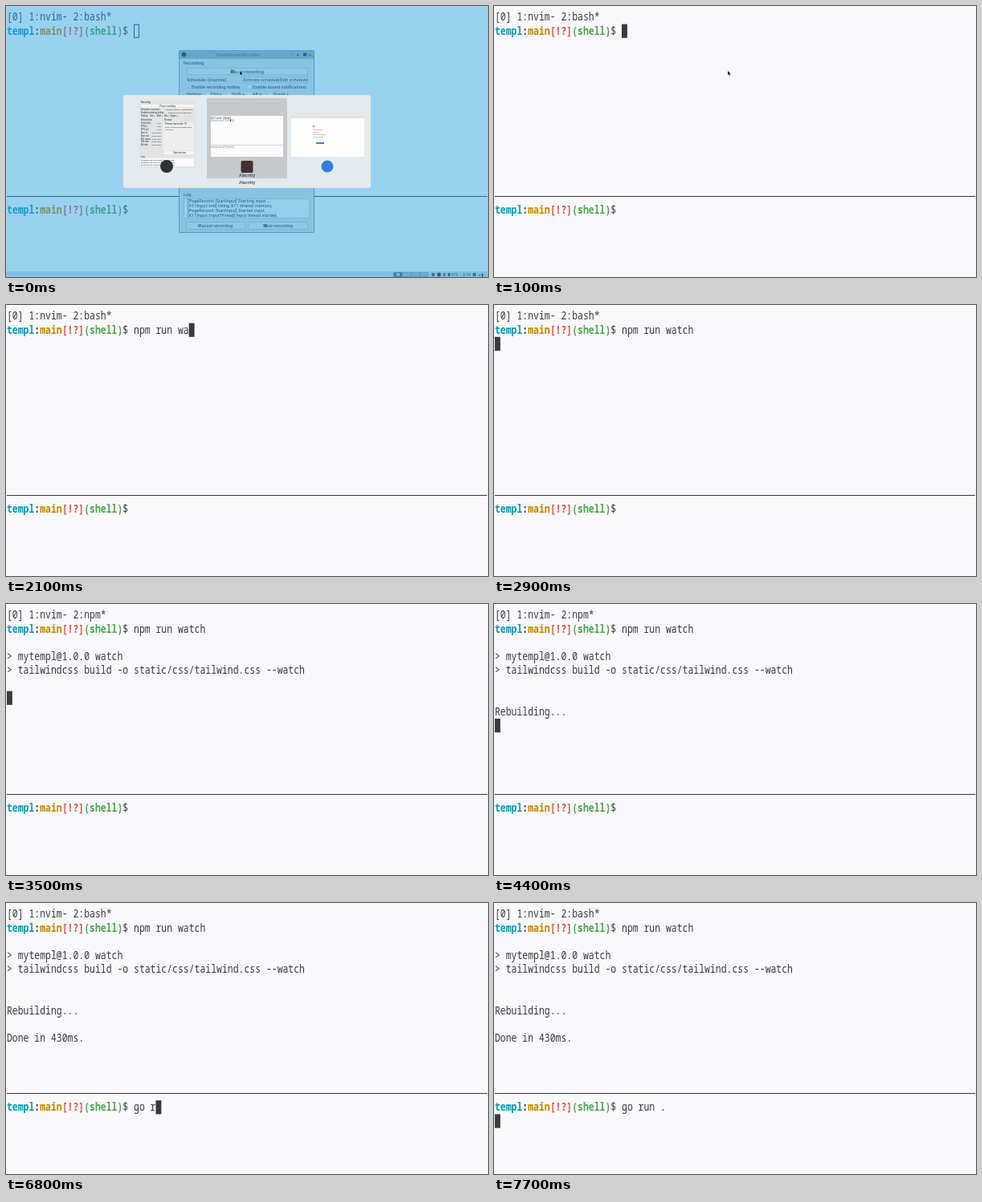
Animation, 600 px wide and 338 px high, one loop 8000 ms. Source, as an HTML page with a canvas:

```html
<!DOCTYPE html>
<html lang="en">
<head>
<meta charset="utf-8">
<title>Terminal session</title>
<style>
html, body { margin: 0; width: 100%; height: 100%; overflow: hidden; background: #f9f8fa; }
canvas { display: block; }
</style>
</head>
<body>
<canvas id="stage" width="600" height="338"></canvas>
<script>
const ctx = document.getElementById('stage').getContext('2d');
const LOOP = 8000, CELL = 6.87, ROW = 17.2, TALL = 1.2;
const INK = '#383a42', PAPER = '#f9f8fa';
const MONO = '11.45px "Noto Sans Mono", monospace';
const PROMPT = [['templ', '#0997b3'], [':', INK], ['main', '#c18401'],
  ['[!?]', '#d9564a'], ['(shell)', '#50a14f']];

// Keystroke times, one per character
const TOP = { text: 'npm run watch', keys: [1000, 1100, 1100, 1200, 1300, 1300, 1500, 1700, 1800, 2100, 2300, 2500, 2600] };
const BOTTOM = { text: 'go run .', keys: [6400, 6500, 6700, 6800, 6900, 7000, 7200, 7300] };
const typed = (cmd, t) => cmd.text.slice(0, cmd.keys.filter(k => k <= t).length);

function rect(x, y, w, h, fill, radius = 0) {
  ctx.fillStyle = fill;
  ctx.beginPath();
  ctx.roundRect(x, y, w, h, radius);
  ctx.fill();
}

function dot(x, y, r, fill) {
  ctx.fillStyle = fill;
  ctx.beginPath();
  ctx.arc(x, y, r, 0, 7);
  ctx.fill();
}

function cells(text, col, row, color = INK, bold = false) {
  ctx.save();
  ctx.font = (bold ? 'bold ' : '') + MONO;
  ctx.textAlign = 'left';
  ctx.fillStyle = color;
  ctx.translate(1, 18.3 + row * ROW);
  ctx.scale(1, TALL);
  [...text].forEach((ch, i) => ctx.fillText(ch, (col + i) * CELL, 0));
  ctx.restore();
}

function prompt(row, command) {
  let col = 0;
  for (const [text, color] of PROMPT) {
    cells(text, col, row, color, true);
    col += text.length;
  }
  cells('$ ' + command, col, row);
}

function cursor(col, row, hollow) {
  const x = 1 + col * CELL, y = 5.4 + row * ROW;
  if (!hollow) return rect(x, y, CELL, ROW, INK);
  ctx.strokeStyle = INK;
  ctx.lineWidth = 1;
  ctx.strokeRect(x + .5, y + .5, CELL - 1, ROW - 1);
}

function terminal(t, hollow) {
  const top = typed(TOP, t), bottom = typed(BOTTOM, t);
  rect(0, 0, 600, 338, PAPER);
  cells('[0] 1:nvim- 2:' + (t >= 3500 && t < 5800 ? 'npm*' : 'bash*'), 0, 0);
  prompt(1, top);
  if (t >= 3500) {
    cells('> mytempl@1.0.0 watch', 0, 3);
    cells('> tailwindcss build -o static/css/tailwind.css --watch', 0, 4);
  }
  if (t >= 4100) cells('Rebuilding...', 0, 7);
  if (t >= 4600) cells('Done in 430ms.', 0, 9);
  rect(1, 237, 598, 1, INK);
  prompt(14, bottom);

  if (t < 2900) cursor(23 + top.length, 1, hollow);
  else if (t < 3500) cursor(0, 2);
  else if (t < 4100) cursor(0, 6);
  else if (t < 4600) cursor(0, 8);
  else if (t < 5800) cursor(0, 10);
  else if (t < 7700) cursor(23 + bottom.length, 14);
  else cursor(0, 15);
}

function label(text, x, y, size = 5.7, align = 'left', color = '#1c2830') {
  ctx.font = size + 'px Roboto, sans-serif';
  ctx.textAlign = align;
  ctx.fillStyle = color;
  ctx.fillText(text, x, y);
}

function button(text, x, y, w, h) {
  rect(x, y, w, h, '#9aa4aa', 1.5);
  rect(x + .5, y + .5, w - 1, h - 1, '#e6e8e9', 1);
  label(text, x + w / 2, y + h / 2 + 2, 5.7, 'center');
}

function check(text, x, y, on) {
  rect(x, y - 4, 4, 4, '#f4f4f4');
  if (on) label('✓', x, y, 5);
  label(text, x + 6, y);
}

function recorder() {
  rect(215, 55, 169, 228, '#839198', 2);
  rect(216, 66, 167, 216, '#dcdfe0');
  rect(216, 55.5, 167, 10.5, '#a0adb3', 2);
  dot(221.5, 60.5, 3, '#26333c');
  label('SimpleScreenRecorder', 289, 62.5, 5.4, 'center', '#4c5a62');
  label('–', 355, 62, 5);
  label('▴', 362, 62, 5);
  rect(370, 58.5, 4, 4, '#26333c');
  label('×', 377, 62.5, 6);

  label('Recording', 221, 72.5);
  button('Pause recording', 225, 77, 151, 9);
  rect(280, 79.5, 1.3, 4.5, '#1c2830');
  rect(282.3, 79.5, 1.3, 4.5, '#1c2830');
  label('Schedule: (inactive)', 225, 94);
  button('Activate schedule', 295, 88, 45, 8);
  button('Edit schedule', 341, 88, 35, 8);
  check('Enable recording hotkey', 225, 103, true);
  check('Enable sound notifications', 301, 103);
  label('Hotkey:', 225, 112);
  ['Ctrl +', 'Shift +', 'Alt +', 'Super +'].forEach((k, i) => check(k, 249 + i * 26, 112));

  label('Log', 221, 237);
  rect(221, 240, 157, 25, '#9aa4aa');
  rect(221.5, 240.5, 156, 24, '#f2f2f2');
  ['[PageRecord::StartInput] Starting input ...',
    '[X11Input::Init] Using X11 shared memory.',
    '[PageRecord::StartInput] Started input.',
    '[X11Input::InputThread] Input thread started.']
    .forEach((line, i) => label(line, 226, 245 + i * 5.9));
  button('Cancel recording', 224, 269.5, 74, 9);
  button('Save recording', 301, 269.5, 75, 9);
  rect(239, 272, 4, 4, '#a08088', 1);
  rect(321, 272, 4, 4, '#52616a', 1);
}

function taskbar() {
  rect(0, 331, 600, 7, '#d2d8db');
  rect(482, 332, 44, 6, '#7a8c96');
  for (let i = 0; i < 4; i++) rect(483 + i * 11, 332.5, 10, 5, i ? '#a9b7be' : '#52636d');
  rect(486, 333.5, 4, 3, '#dce3e6');
  rect(530, 333, 3.5, 4, '#42525c');
  dot(539, 335, 2.4, '#26333c');
  rect(544, 333, 3, 4, '#a85d55');
  rect(550, 333, 3, 4, '#42525c');
  label('47%  - 3:14', 554, 337, 5);
  rect(581, 333, 4, 4, '#42525c');
  label('◂ ▮', 588, 337, 5);
}

function switcher() {
  rect(146, 111, 308, 116, 'rgba(231,235,238,.97)', 3);
  rect(250, 115, 100, 100, '#c6c9cb');

  rect(166, 117, 70, 85, '#e2e3e4');
  label('Recording', 168, 121, 2.7);
  rect(168, 123, 66, 3.5, '#f5f5f5');
  label('Pause recording', 201, 126, 2.7, 'center');
  label('Schedule: (inactive)', 168, 130, 2.7);
  label('Activate schedule   Edit schedule', 198, 130, 2.4);
  label('Enable recording hotkey', 168, 134, 2.7);
  label('Enable sound notifications', 202, 134, 2.5);
  label('Hotkey:   Ctrl +   Shift +   Alt +   Super +', 168, 138, 2.7);
  label('Information', 168, 143, 2.7);
  label('Preview', 197, 143, 2.7);
  ['Total time:', 'FPS in:', 'FPS out:', 'Size in:', 'Size out:', 'File name:', 'File size:', 'Bit rate:']
    .forEach((name, i) => {
      label(name, 168, 147 + i * 3.9, 2.7);
      label(i < 3 ? '0.00' : '1920x1080', 193, 147 + i * 3.9, 2.5, 'right');
    });
  rect(196, 145, 38, 35, '#eeeeee');
  label('Preview frame rate: 10', 198, 148, 2.7);
  label('Note: Previewing requires extra', 198, 152, 2.4);
  label('CPU time.', 198, 155, 2.4);
  rect(197, 181, 37, 4, '#f5f5f5');
  label('Start preview', 216, 184, 2.7, 'center');
  label('Log', 168, 189, 2.7);
  rect(167, 190, 67, 10, '#fafafa');
  for (let i = 0; i < 3; i++) label('[PageRecord::StartInput] Started input.', 168, 193 + i * 3, 2.5);

  rect(255, 137, 90, 51, '#fbfbfc');
  label('[0] 1:nvim- 2:bash*', 255.5, 140.5, 3);
  label('templ:main[!?](shell)$', 255.5, 143.5, 3, 'left', '#7c8d78');
  rect(279, 141, 1, 3, INK);
  label('templ:main[!?](shell)$', 255.5, 177, 3, 'left', '#7c8d78');
  rect(255, 173, 90, .4, '#aaa');

  rect(355, 137, 91, 51, '#fdfdfd');
  rect(355, 137, 91, 3, '#dfe3e7');
  dot(383, 150, 1.4, '#a9b4bf');
  for (let i = 0; i < 4; i++) rect(382, 154 + i * 3, [12, 8, 16, 13][i], .7, '#aab0b5');
  rect(386, 170, 10, 2, '#3d7fdc');

  dot(200, 200, 8, '#2d3235');
  rect(292.5, 193, 15, 15, '#40322f', 2);
  dot(400, 200, 7.5, '#327fdb');
  label('Alacritty', 300, 212.5, 5.5, 'center');
  label('Alacritty', 300, 221.5, 5.5, 'center');
}

function pointer(x, y) {
  ctx.beginPath();
  for (const [dx, dy] of [[0, 0], [0, 5], [1.2, 4], [2, 6], [3, 5.5], [2.2, 3.7], [3.8, 3.5]]) ctx.lineTo(x + dx, y + dy);
  ctx.closePath();
  ctx.strokeStyle = '#fff';
  ctx.lineWidth = .8;
  ctx.stroke();
  ctx.fillStyle = '#202226';
  ctx.fill();
}

function draw(t) {
  const intro = t < 100;
  terminal(t, intro);
  if (intro) {
    taskbar();
    recorder();
    rect(0, 0, 600, 338, 'rgba(36,161,228,.45)');
    switcher();
  }
  if (t < 900) {
    // The pointer slides off the lower right corner
    const p = Math.max(0, Math.floor(t / 100) - 1) / 8;
    pointer(291 + 312 * p * p, 81 + 260 * p * p);
  }
}

function frame() {
  draw(performance.now() % LOOP);
  requestAnimationFrame(frame);
}
frame();
</script>
</body>
</html>
```
